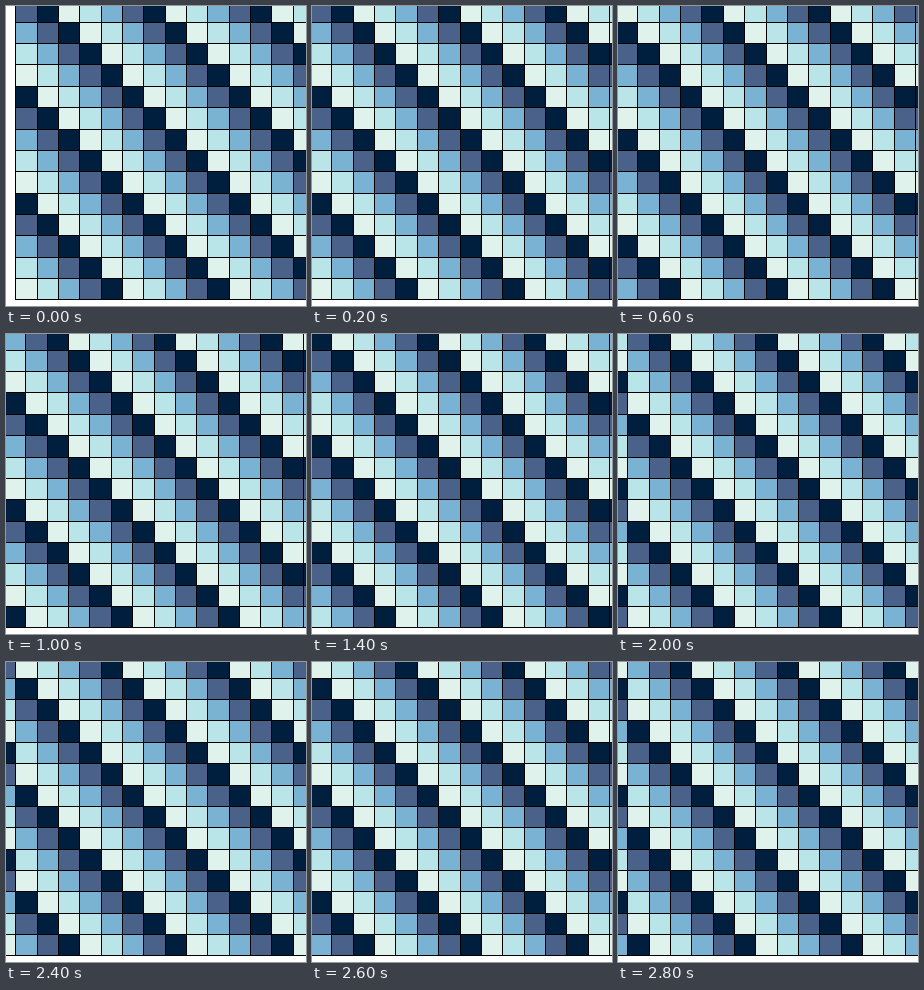
Write an HTML page with a canvas that moves like this. It is 300x300 px and loops after 3 s.

```html
<!DOCTYPE html>
<html lang="en">
<head>
<meta charset="utf-8">
<title>Drifting tiles</title>
<style>
  html, body { margin: 0; width: 100%; height: 100%; overflow: hidden; background: #fff; }
  canvas { display: block; }
</style>
</head>
<body>
<canvas id="stage" width="300" height="300"></canvas>
<script>
const ctx = document.getElementById('stage').getContext('2d');
const COLORS = ['#DFF2EB', '#B9E5E8', '#7AB2D3', '#4A628A', '#001F3F'];
const COUNT = 14;
const PITCH = 299 / COUNT;
const STEP = 200;
const STEPS = 15;
const TOP = 293.37 - 299;

const edges = start =>
  Array.from({ length: COUNT + 1 }, (_, i) => Math.round(start + i * PITCH));

const ys = edges(TOP);
const evenXs = edges(9.2);
const oddXs = edges(19.4 - PITCH);

function drawGrid(step) {
  const odd = step % 2 === 1;
  const xs = odd ? oddXs : evenXs;
  const shift = step + (odd ? 2 : 3);
  for (let r = 0; r < COUNT; r++) {
    for (let c = 0; c < COUNT; c++) {
      ctx.fillStyle = COLORS[(c - r + shift + 3 * COLORS.length) % COLORS.length];
      ctx.fillRect(xs[c], ys[r], xs[c + 1] - xs[c], ys[r + 1] - ys[r]);
    }
  }
  const width = xs[COUNT] - xs[0] + 1;
  const height = ys[COUNT] - ys[0] + 1;
  ctx.fillStyle = '#000';
  for (const x of xs) ctx.fillRect(x, ys[0], 1, height);
  for (const y of ys) ctx.fillRect(xs[0], y, width, 1);
}

// Each grid is laid over the one before, whose edge stays visible at the side.
function draw(step) {
  ctx.fillStyle = '#fff';
  ctx.fillRect(0, 0, 300, 300);
  if (step > 0) drawGrid(step - 1);
  drawGrid(step);
}

let shown = -1;
const begin = performance.now();

function tick() {
  const step = Math.floor((performance.now() - begin) / STEP) % STEPS;
  if (step !== shown) draw(shown = step);
  requestAnimationFrame(tick);
}
tick();
</script>
</body>
</html>
```
